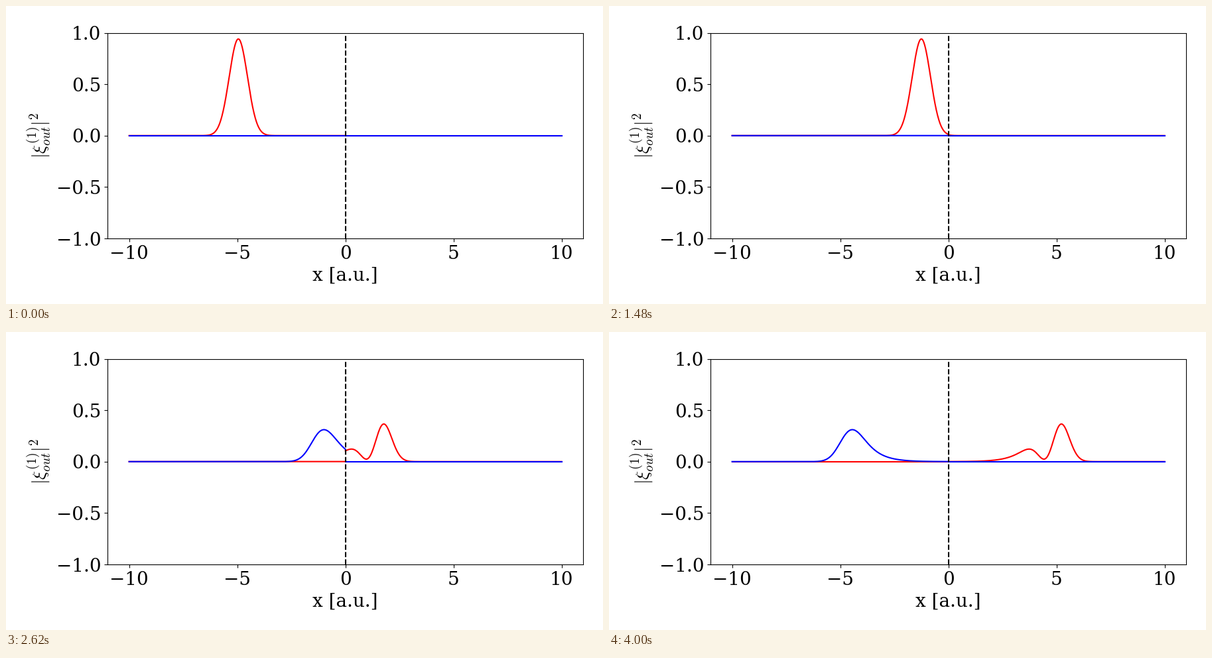
A matplotlib script that plays this animation: 900x450 px, repeating every 4020 ms.

```python
import numpy as np
import matplotlib.pyplot as plt
from matplotlib.animation import FuncAnimation

plt.rcParams.update({
    "font.family": "DejaVu Serif",
    "font.size": 20,
    "mathtext.fontset": "cm",
})

FRAMES = 201
DT = 0.05
START = -4.95      # pulse centre at the first frame
WIDTH = 0.6        # amplitude width of the pulse
GAMMA = 1.61       # emitter decay rate
DETUNING = 0.45


def pulse(s):
    return (np.pi * WIDTH**2) ** -0.25 * np.exp(-s**2 / (2 * WIDTH**2))


# Emitter response to the pulse: exponential memory with detuning
S = np.linspace(-8, 17, 25001)
RATE = GAMMA / 2 + 1j * DETUNING
drive = np.exp(RATE * S) * pulse(S)
area = np.concatenate(([0], np.cumsum((drive[1:] + drive[:-1]) / 2))) * (S[1] - S[0])
RESPONSE = GAMMA / 2 * np.exp(-RATE * S) * area


def emitted(s):
    return np.interp(s, S, RESPONSE, left=0)


left = np.linspace(-10, 0, 500)
right = np.linspace(0, 10, 500)

fig = plt.figure(figsize=(9, 4.5), dpi=100)
ax = fig.add_subplot()
fig.subplots_adjust(left=0.17, right=0.967, bottom=0.22, top=0.91)

incoming, = ax.plot(left, 0 * left, "r")
transmitted, = ax.plot(right, 0 * right, "r")
reflected, = ax.plot(left, 0 * left, "b")
ax.plot(right, 0 * right, "b")
ax.axvline(0, color="k", ls="--")

ax.set_xlim(-11, 11)
ax.set_ylim(-1, 1)
ax.set_xticks([-10, -5, 0, 5, 10])
ax.set_yticks([-1, -0.5, 0, 0.5, 1])
ax.set_xlabel("x [a.u.]")
ax.set_ylabel(r"$|\xi_{out}^{(1)}|^2$")


def update(i):
    centre = START + DT * i
    incoming.set_ydata(pulse(left - centre) ** 2)
    ahead = centre - right
    transmitted.set_ydata(np.abs(pulse(ahead) - emitted(ahead)) ** 2)
    reflected.set_ydata(np.abs(emitted(centre + left)) ** 2)
    return incoming, transmitted, reflected


anim = FuncAnimation(fig, update, frames=FRAMES, interval=20, repeat=True)
plt.show()
```
